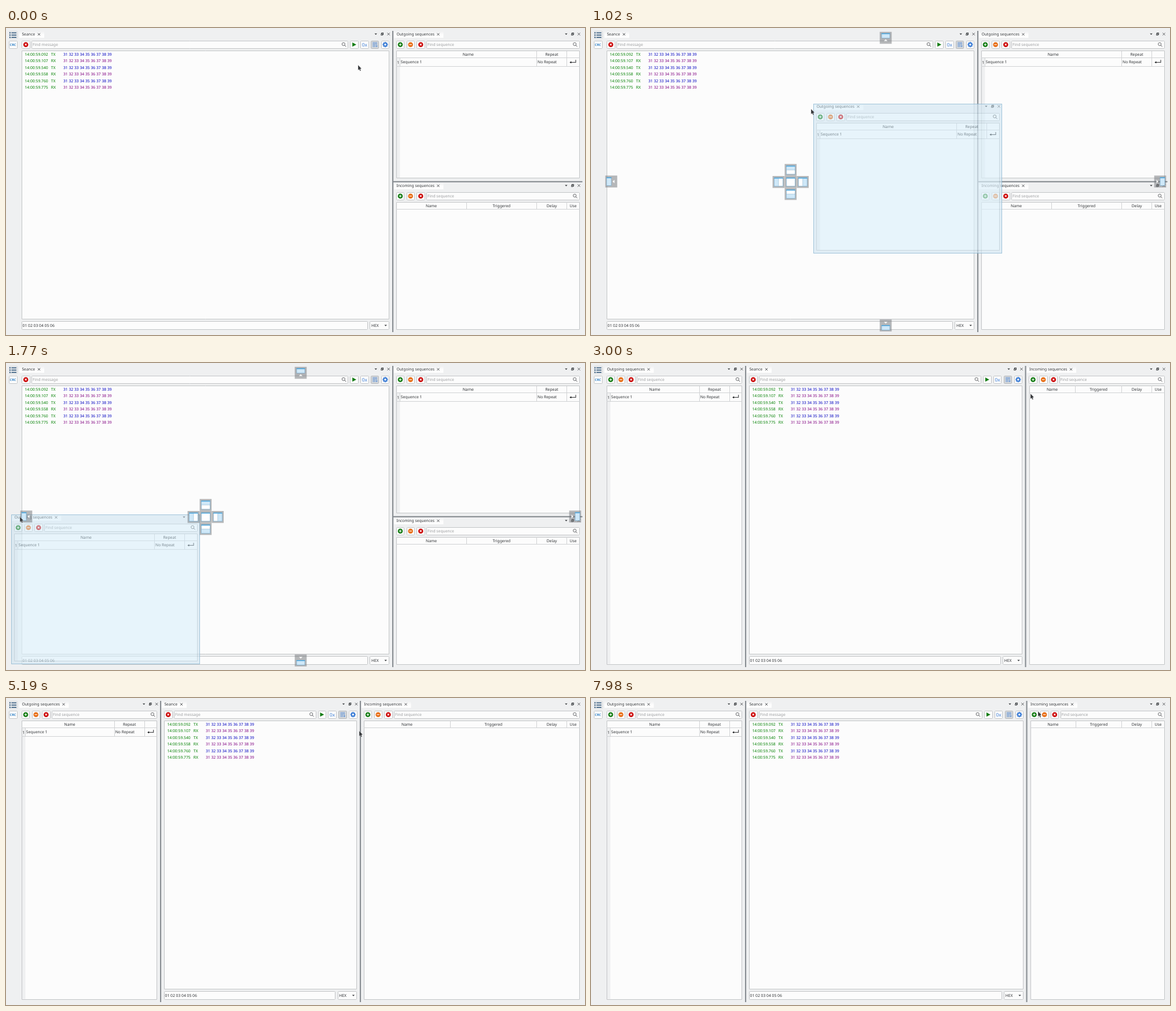
An HTML page with a canvas that plays this animation: 1000x531 px, repeating every 8000 ms.

```html
<!DOCTYPE html>
<html lang="en">
<head>
<meta charset="utf-8">
<title>Dock layout demo</title>
<style>
html, body { margin: 0; width: 100%; height: 100%; overflow: hidden; background: #eff0f1; }
canvas { display: block; width: 1000px; height: 531px; }
</style>
</head>
<body>
<canvas id="stage" width="1000" height="531"></canvas>
<script>
const LOOP = 8000, STEP = 30;
const DRAG_START = 420, PREVIEW_START = 1920, DROP = 2160;
const GRAB = [684, 10];
const BG = '#eff0f1', PAPER = '#fcfcfc', LINE = '#c3c5c7', GRID = '#d0d2d4', INK = '#2f3235', DIM = '#9b9d9f';
const GREEN = '#157d15', ORANGE = '#e8701a', RED = '#cc0808', BLUE = '#3f7fd6';

// [time, x, y, eased]
const CURSOR = [
  [0, 608, 64], [330, 684, 10, 1], [400, 684, 10], [690, 571, 84, 1], [720, 568, 86],
  [1020, 380, 140], [1290, 114, 216], [1320, 86, 222], [1410, 45, 246], [1560, 27, 262],
  [1740, 24, 266], [1840, 24, 266], [1950, 31, 266, 1], [2220, 31, 266], [3000, 759, 53, 1],
  [3330, 759, 53], [3660, 749, 57, 1], [4200, 749, 57], [4390, 690, 57, 1], [4530, 690, 57],
  [4780, 610, 57, 1], [6840, 610, 57], [7650, 750, 57, 1], [7980, 772, 23, 1], [8000, 772, 23]
];
const SPLIT = [
  [0, 750.5], [4200, 750.5], [4390, 691, 0, 1], [4530, 691], [4780, 612, 0, 1],
  [6840, 612], [7650, 752.5, 0, 1], [8000, 752.5]
];

const stage = document.getElementById('stage').getContext('2d');
let g = stage;

function track(keys, t) {
  const i = Math.max(1, keys.findIndex(k => k[0] >= t));
  const a = keys[i - 1], b = keys[i];
  let p = Math.min(1, Math.max(0, (t - a[0]) / (b[0] - a[0])));
  if (b[3]) p = p * p * (3 - 2 * p);
  return [1, 2].map(n => (a[n] || 0) + ((b[n] || 0) - (a[n] || 0)) * p);
}

function rect(x, y, w, h, color) {
  g.fillStyle = color;
  g.fillRect(x, y, w, h);
}

function box(x1, y1, x2, y2, fill = PAPER, line = LINE, radius = 1) {
  const x = Math.round(x1) + .5, y = Math.round(y1) + .5;
  g.beginPath();
  g.roundRect(x, y, Math.round(x2) - .5 - x, Math.round(y2) - .5 - y, radius);
  g.fillStyle = fill;
  g.fill();
  g.lineWidth = 1;
  g.strokeStyle = line;
  g.stroke();
}

function text(s, x, y, color = INK, align = 'left', font = '6.78px') {
  g.font = `${font} "Noto Sans", sans-serif`;
  g.textRendering = 'geometricPrecision';
  g.textAlign = align;
  g.fillStyle = color;
  g.fillText(s, x, y + 2.5);
}

function poly(points, color) {
  g.beginPath();
  points.forEach(([x, y]) => g.lineTo(x, y));
  g.closePath();
  g.fillStyle = color;
  g.fill();
}

function strokes(color, width, ...segments) {
  g.beginPath();
  for (const [x1, y1, x2, y2] of segments) {
    g.moveTo(x1, y1);
    g.lineTo(x2, y2);
  }
  g.lineWidth = width;
  g.strokeStyle = color;
  g.stroke();
}

const vline = (x, y1, y2) => rect(Math.round(x), y1, 1, y2 - y1, GRID);
const hline = (y, x1, x2) => rect(x1, Math.round(y), x2 - x1, 1, GRID);

function cross(x, y, r, color, width) {
  strokes(color, width, [x - r, y - r, x + r, y + r], [x - r, y + r, x + r, y - r]);
}

function downArrow(x, y) {
  poly([[x - 2.2, y - 1.1], [x + 2.2, y - 1.1], [x, y + 1.3]], INK);
}

function button(x, y, fill, line) {
  box(x - 7.2, y - 7.2, x + 7.3, y + 7.2, fill, line);
}

function disc(x, y, color, sign) {
  button(x, y);
  g.beginPath();
  g.arc(x, y, 4.3, 0, 7);
  g.fillStyle = color;
  g.fill();
  if (sign === 'x') return cross(x, y, 1.5, '#fff', 1.1);
  strokes('#fff', 1.1, [x - 2.2, y, x + 2.2, y]);
  if (sign === '+') strokes('#fff', 1.1, [x, y - 2.2, x, y + 2.2]);
}

function searchField(x1, x2, y, hint) {
  box(x1, y - 7, x2, y + 7);
  text(hint, x1 + 2, y, DIM);
  const x = x2 - 7.5;
  g.beginPath();
  g.arc(x - .8, y - .8, 2.6, 0, 7);
  g.lineWidth = .7;
  g.strokeStyle = INK;
  g.stroke();
  strokes(INK, .8, [x + 1.1, y + 1.1, x + 3.6, y + 3.6]);
}

function titleBar(L, R, y, title, closeAt) {
  const fade = g.createLinearGradient(0, y - 5, 0, y + 1);
  fade.addColorStop(0, BG);
  fade.addColorStop(1, '#fdfdfd');
  rect(L - 4, y - 5, closeAt + 13, 11.5, fade);
  text(title, L + .4, y);
  cross(L + closeAt, y + .4, 2.1, INK, .8);
  downArrow(R - 23, y);
  const x = R - 12;
  g.lineWidth = .9;
  g.strokeStyle = INK;
  g.strokeRect(x - 1, y - 2, 2.9, 2.9);
  rect(x - 2.2, y - .8, 3.2, 3.2, INK);
  rect(x - 1.4, y + .4, 1.6, 1.2, BG);
  cross(R - 1, y, 2.1, INK, .8);
}

function sequenceTools(L, R, y) {
  disc(L + 7, y, GREEN, '+');
  disc(L + 24.7, y, ORANGE, '-');
  disc(L + 42.3, y, RED, 'x');
  searchField(L + 52, R, y, 'Find sequence');
}

function outgoing(L, R, bottom) {
  titleBar(L, R, 10.5, 'Outgoing sequences', 72.5);
  sequenceTools(L, R, 28.7);
  box(L, 39, R, bottom, PAPER, LINE, 0);
  rect(L + 1, 52, 5.5, bottom - 53, BG);
  hline(51, L, R);
  hline(66, L, R);
  vline(L + 6, 51, 66);
  vline(R - 74.5, 40, 66);
  vline(R - 22.5, 40, 66);
  text('Name', (L + R - 68) / 2, 45.5, INK, 'center');
  text('Repeat', R - 48, 45.5, INK, 'center');
  text('1', L + 1.2, 59);
  text('Sequence 1', L + 7.8, 58.6);
  text('No Repeat', R - 72.5, 58.6);
  const x = R - 11.5;
  strokes('#17191b', .9, [x + 5, 55, x + 5, 59.4], [x + 5.4, 59.4, x - 4, 59.4]);
  poly([[x - 5.6, 59.4], [x - 2.6, 57.6], [x - 2.6, 61.2]], '#17191b');
}

function incoming(L, R, dy) {
  titleBar(L, R, 10.5 + dy, 'Incoming sequences', 72.5);
  sequenceTools(L, R, 28.7 + dy);
  const top = 39 + dy, end = R - 74, mid = (L + end) / 2, y = 45.5 + dy;
  box(L, top, R, 521.5, PAPER, LINE, 0);
  hline(51 + dy, L, R);
  [mid, end, R - 22].forEach(x => vline(x - .5, top, 51 + dy));
  text('Name', (L + mid) / 2, y, INK, 'center');
  text('Triggered', (mid + end) / 2, y, INK, 'center');
  text('Delay', R - 48, y, INK, 'center');
  text('Use', R - 11, y, INK, 'center');
}

function gear(x, y) {
  g.fillStyle = BLUE;
  for (let i = 0; i < 8; i++) {
    g.save();
    g.translate(x, y);
    g.rotate(i * Math.PI / 4);
    g.fillRect(-1, -4.6, 2, 2.5);
    g.restore();
  }
  g.beginPath();
  g.arc(x, y, 2.7, 0, 7);
  g.lineWidth = 2;
  g.strokeStyle = BLUE;
  g.stroke();
}

function seance(L, R) {
  const y = 28.7;
  titleBar(L, R, 10.5, 'Seance', 30);
  disc(L + 7.2, y, RED, 'x');
  searchField(L + 17, R - 70.5, y, 'Find message');
  button(R - 60.3, y);
  poly([[R - 63.5, y - 3.6], [R - 56.6, y], [R - 63.5, y + 3.6]], GREEN);
  button(R - 42.5, y);
  text('0x', R - 42.5, y + .3, BLUE, 'center', '8.2px');
  button(R - 24.6, y, '#d5d8db', '#b4b7ba');
  const x = R - 24.6;
  strokes(BLUE, .8, ...[-3.4, -1.2, 1, 3.2].map((d, i) => [x - 4, y + d, x + (i < 2 ? 4 : 1), y + d]));
  strokes(BLUE, .8, [x + 3, y, x + 3, y + 3.6], [x + 1.5, y + 2, x + 3, y + 3.8], [x + 4.5, y + 2, x + 3, y + 3.8]);
  button(R - 6.7, y);
  gear(R - 6.7, y);

  box(L, 39, R, 503.5, PAPER, LINE, 0);
  ['092', '107', '540', '558', '760', '775'].forEach((ms, i) => {
    const row = 45.4 + i * 11.5, rx = i % 2;
    text('14:00:59.' + ms, L + 5.4, row, '#008000');
    text(rx ? 'RX' : 'TX', L + 50.8, row, '#008000');
    text('31 32 33 34 35 36 37 38 39', L + 72, row, rx ? '#800080' : '#0000c0');
  });

  box(L, 507, R - 37, 521.5);
  text('01 02 03 04 05 06', L + 1.6, 514.5);
  box(R - 33.5, 507, R, 521.5);
  text('HEX', R - 30.7, 514.5);
  downArrow(R - 6, 514.5);
}

function sidebar() {
  for (const y of [8.4, 12.3, 16.2]) {
    rect(6, y - 1, 2, 2, '#2d5478');
    rect(9.3, y - .8, 8.7, 1.6, '#2d5478');
  }
  box(4.5, 5, 19.5, 19, 'transparent', '#d5d8da');
  box(4.5, 21.5, 19.5, 35.5);
  text('CRC', 12, 28.2, '#2f7fc4', 'center', '600 5.6px');
}

const splitter = x => rect(x - 1, 5, 2.1, 521, '#888d92');

// Small window picture: side is the tinted half, or '' for none.
function windowIcon(x, y, w, h, side, whole) {
  rect(x, y, w, h, whole ? '#cfe8f8' : '#fff');
  const halfW = w / 2, halfH = h / 2;
  g.setLineDash([1, 1]);
  if (side === 'left' || side === 'right') {
    rect(side === 'left' ? x : x + halfW, y, halfW, h, '#cfe8f8');
    strokes('#5b8fb0', .7, [x + halfW, y + 2, x + halfW, y + h]);
  } else if (side) {
    rect(x, side === 'top' ? y : y + halfH, w, halfH, '#cfe8f8');
    strokes('#5b8fb0', .7, [x, y + halfH, x + w, y + halfH]);
  }
  g.setLineDash([]);
  g.lineWidth = .6;
  g.strokeStyle = '#6ba6cb';
  g.strokeRect(x, y, w, h);
  rect(x - .2, y - .2, w + .4, 1.4, '#3f9fd9');
}

function pad(x, y) {
  rect(x - 10.3, y - 10.3, 20.6, 20.6, 'rgba(112,116,120,.5)');
}

// Triangle whose base lies at distance 5.5 from the pad centre, pointing inwards or outwards.
function edgeMark(x, y, dx, dy) {
  const w = dy ? 14 : 8, h = dy ? 8 : 14;
  pad(x, y);
  windowIcon(x - w / 2 + dx * 4, y - h / 2 + dy * 3.7, w, h, '', true);
  const base = -5.5 + (dx + dy > 0 ? -.8 : 0), apex = base + 3.1;
  const at = (along, across) => [x + dx * along + dy * across, y + dy * along + dx * across];
  poly([at(base, -3), at(base, 3), at(apex, 0)], '#fff');
}

function edgeMarks() {
  edgeMark(509, 17, 0, -1);
  edgeMark(509, 514.5, 0, 1);
  edgeMark(35, 265.5, -1, 0);
  edgeMark(983, 265.5, 1, 0);
}

function crossMarks() {
  const cells = [[0, 0, ''], [0, -1, 'top'], [0, 1, 'bottom'], [-1, 0, 'left'], [1, 0, 'right']];
  for (const [dx, dy, side] of cells) {
    const x = 344.8 + dx * 20.9, y = 266.3 + dy * 20.8;
    pad(x, y);
    windowIcon(x - 7.5, y - 7.2, 15, 14.6, side);
  }
}

function tint(x, y, w, h, fillAlpha, lineAlpha) {
  rect(x, y, w, h, `rgba(110,195,240,${fillAlpha})`);
  g.lineWidth = 1;
  g.strokeStyle = `rgba(60,130,175,${lineAlpha})`;
  g.strokeRect(x + .5, y + .5, w - 1, h - 1);
}

function makeGhost() {
  const copy = document.createElement('canvas');
  copy.width = 326;
  copy.height = 259;
  g = copy.getContext('2d');
  rect(0, 0, 326, 259, BG);
  g.translate(-669, -6);
  outgoing(674, 990.5, 260);
  g = stage;
  return copy;
}
const ghost = makeGhost();

function drawDrag(t, [cx]) {
  if (t >= PREVIEW_START) {
    tint(22, 5, 325, 521, .3, .7);
  } else {
    const [x, y] = track(CURSOR, t - STEP);
    const left = Math.round(669 + x - GRAB[0]), top = Math.round(6 + y - GRAB[1]);
    g.globalAlpha = .6;
    g.drawImage(ghost, left, top);
    g.globalAlpha = 1;
    tint(left, top, 326, 259, .15, .38);
  }
  edgeMarks();
  if (cx < 667) crossMarks();
}

function pointer([x, y]) {
  const shape = [[0, 0], [0, 9], [2.1, 7.4], [3.5, 10.4], [5, 9.6], [3.7, 6.9], [6, 6.2]];
  g.save();
  g.translate(x, y);
  g.lineJoin = 'round';
  poly(shape, '#35373a');
  g.lineWidth = .5;
  g.strokeStyle = 'rgba(255,255,255,.6)';
  g.stroke();
  g.restore();
}

function draw(t) {
  const at = track(CURSOR, t);
  rect(0, 0, 1000, 531, BG);
  sidebar();
  if (t < DROP) {
    seance(27, 661.7);
    outgoing(674, 990.5, 260);
    incoming(674, 990.5, 262);
    splitter(668);
    rect(669, 264.8, 326.5, 2.1, '#888d92');
    if (t >= DRAG_START + STEP) drawDrag(t, at);
  } else {
    const [split] = track(SPLIT, t);
    outgoing(27, 261.2, 521.5);
    seance(273, split - 6);
    incoming(split + 6, 990.5, 0);
    splitter(267);
    splitter(split);
  }
  pointer(at);
}

const start = performance.now();
function frame() {
  const t = (performance.now() - start) % LOOP;
  draw(Math.floor(t / STEP) * STEP);
  requestAnimationFrame(frame);
}
frame();
</script>
</body>
</html>
```
